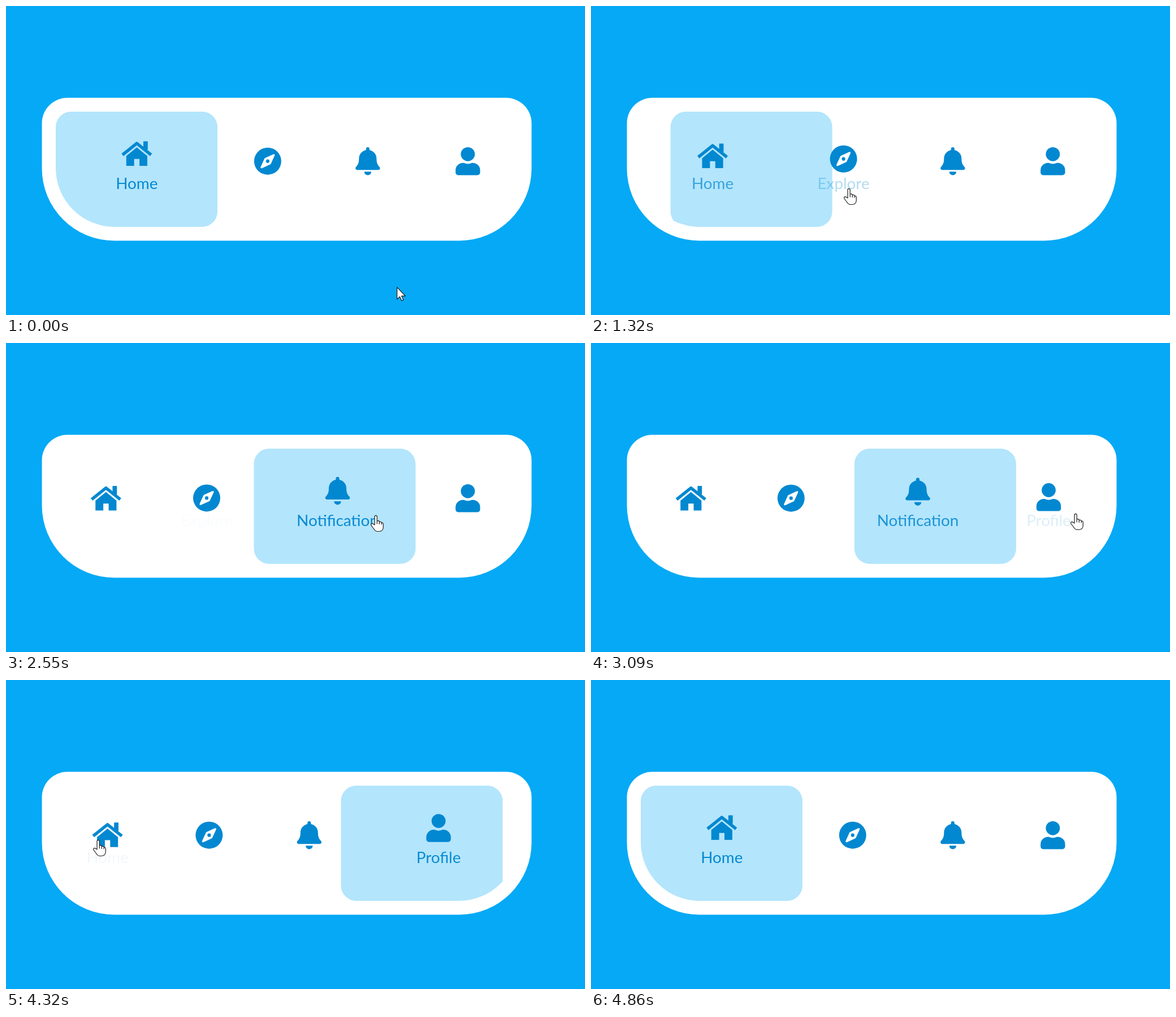
An HTML page for the animation above (5410 ms loop, 1024 by 547 pixels).

```html
<!DOCTYPE html>
<html lang="en">
<head>
<meta charset="utf-8">
<title>Navigation bar</title>
<style>
  html, body { margin: 0; width: 100%; height: 100%; overflow: hidden; background: #05a9f5; }
  svg { display: block; }
  text { font: 27.8px Lato, sans-serif; text-anchor: middle; }
</style>
</head>
<body>
<svg width="1024" height="547" viewBox="0 0 1024 547">
  <clipPath id="inner"><path id="window"/></clipPath>
  <path id="bar" fill="#fff"/>
  <rect id="pill" y="187" width="286" height="204" rx="27" fill="#b3e5fc"/>

  <g fill="#0288d1">
    <g class="item">
      <g>
        <path d="M-25.300 2.200L0-18.100 25.300 2.200" fill="none" stroke="#0288d1" stroke-width="5.500" stroke-linejoin="round"/>
        <rect x="11.600" y="-21.700" width="7.800" height="15" rx="1"/>
        <path d="M0-11L18.600 4.300V21.700H4.700V9.500H-4.700V21.700H-18.600V4.300z"/>
      </g>
      <text y="324">Home</text>
    </g>
    <g class="item">
      <g>
        <path fill-rule="evenodd" d="M-24 0a24 24 0 0 1 48 0a24 24 0 0 1-48 0zM9.700-12.200L-4.300-5.800Q-5.400-5.400-5.800-4.300L-12.200 9.700Q-13.400 13.400-9.700 12.200L4.300 5.800Q5.400 5.400 5.800 4.300L12.200-9.700Q13.400-13.400 9.700-12.200z"/>
        <circle r="3.100"/>
      </g>
      <text y="324">Explore</text>
    </g>
    <g class="item">
      <g>
        <path d="M-3.100-19.600v-2a3.100 3.100 0 0 1 6.200 0v2C10.200-18 15.500-12.200 15.500-4.600C15.500 5.300 18.900 8.200 20.800 10.200A3.100 3.100 0 0 1 18.600 15.500H-18.600A3.100 3.100 0 0 1-20.800 10.200C-18.900 8.200-15.500 5.300-15.500-4.600C-15.500-12.200-10.200-18-3.100-19.600z"/>
        <path d="M-6.200 18.600a6.200 6.200 0 0 0 12.400 0z"/>
      </g>
      <text y="324">Notification</text>
    </g>
    <g class="item">
      <g>
        <circle cy="-12.400" r="12.400"/>
        <path d="M-8.700 3.100h1.600a16.800 16.800 0 0 0 14.200 0h1.600a13 13 0 0 1 13 13v4a4.600 4.600 0 0 1-4.600 4.600h-34.200a4.600 4.600 0 0 1-4.600-4.600v-4a13 13 0 0 1 13-13z"/>
      </g>
      <text y="324">Profile</text>
    </g>
  </g>

  <g id="cursor" fill="#fff" stroke="#1c1c1c" stroke-width="1.200" stroke-linejoin="round">
    <path id="arrow" d="M.6 .8V22L5.400 17.600 8.700 24.600 11.800 23.200 8.600 16.400H15.200z"/>
    <path id="hand" d="M-2 17V2.500a2 2 0 0 1 4.200 0V10q3.600-1 4 1.600q3.500-1 4 1.600q3-.4 3 2.600V21c0 5-3 7.500-7.500 7.500H3c-3.500 0-5-2-6.500-4.500L-8.300 17.500c-.8-2.500 1.500-4 4-2zM2.200 10V15.500M6.200 11.600V16M10.200 13.200V16.500"/>
  </g>
</svg>
<script>
const LOOP = 5410, LAST = 63, STEP = 4860 / LAST;
const LEFT = 88, NARROW = 177, WIDE = 286, EASE_MS = 450;
const START = [1221, 2179, 3030, 4290];   // each activates the next item in turn

// time, x, y of the pointer tip at its turning points
const path = [
  [0, 691, 497], [620, 461, 359], [1000, 456, 323], [1400, 456, 323],
  [1780, 506, 321], [2090, 654, 305], [2560, 654, 305], [2940, 857, 302],
  [3320, 857, 302], [3470, 769, 345], [3630, 472, 427], [3930, 55, 335],
  [4090, 163, 283], [4480, 163, 283], [4850, 1040, 560]
];

const $ = id => document.getElementById(id);
const set = (el, name, value) => el.setAttribute(name, value);
const mix = (a, b, p) => a + (b - a) * p;

// Box with top corners of radius r and bottom corners of radius R
const box = (x, y, w, h, r, R) =>
  `M${x + r} ${y}h${w - 2 * r}a${r} ${r} 0 0 1 ${r} ${r}v${h - r - R}a${R} ${R} 0 0 1 ${-R} ${R}` +
  `h${2 * R - w}a${R} ${R} 0 0 1 ${-R} ${-R}v${r + R - h}a${r} ${r} 0 0 1 ${r} ${-r}z`;

set($('bar'), 'd', box(63.5, 162.5, 866, 253, 45, 128));
set($('window'), 'd', box(88, 187, 817, 204, 21, 104));

const items = [...document.querySelectorAll('.item')].map(el => el.children);

// The pill stays inside the bar while it slides
const holder = document.createElementNS('http://www.w3.org/2000/svg', 'g');
set(holder, 'clip-path', 'url(#inner)');
$('pill').replaceWith(holder);
const pill = holder.appendChild(document.createElementNS('http://www.w3.org/2000/svg', 'path'));
set(pill, 'd', box(0, 187, WIDE, 204, 27, 27));
set(pill, 'fill', '#b3e5fc');

// cubic-bezier(.25, .1, .25, 1)
function ease(x) {
  if (x <= 0 || x >= 1) return x <= 0 ? 0 : 1;
  const curve = (a, b, s) => 3 * a * s * (1 - s) ** 2 + 3 * b * s * s * (1 - s) + s ** 3;
  let lo = 0, hi = 1;
  for (let i = 0; i < 24; i++) {
    const mid = (lo + hi) / 2;
    if (curve(.25, .25, mid) < x) lo = mid; else hi = mid;
  }
  return curve(.1, 1, lo);
}

// How active each item is, 0 to 1
const weights = t => START.reduce((w, start, n) => {
  const p = ease((t - start) / EASE_MS);
  return w.map((v, i) => mix(v, +(i === (n + 1) % 4), p));
}, [1, 0, 0, 0]);

function pointer(t) {
  const i = path.findIndex(k => k[0] > t);
  if (i < 0) return path[path.length - 1].slice(1);
  const [t0, x0, y0] = path[i - 1], [t1, x1, y1] = path[i];
  const p = (t - t0) / (t1 - t0);
  return [mix(x0, x1, p), mix(y0, y1, p)];
}

function draw(now) {
  const t = Math.min(LAST, Math.floor(now % LOOP / STEP + .1)) * STEP;
  const w = weights(t);
  const slide = w.reduce((sum, v, i) => sum + v * i * NARROW, 0);
  set(pill, 'transform', `translate(${LEFT + slide} 0)`);

  let x = LEFT + .3;
  items.forEach(([icon, text], i) => {
    const width = mix(NARROW, WIDE, w[i]), cx = x + width / 2;
    set(icon, 'transform', `translate(${cx} ${mix(274.7, 261.3, w[i])})`);
    set(text, 'x', cx);
    set(text, 'opacity', w[i]);
    x += width;
  });

  const [px, py] = pointer(t);
  const over = px > 88 && px < 905 && py > 187 && py < 391;
  set($('cursor'), 'transform', `translate(${px} ${py})`);
  set($('hand'), 'display', over ? 'inline' : 'none');
  set($('arrow'), 'display', over ? 'none' : 'inline');
}

function tick(now) {
  draw(now);
  requestAnimationFrame(tick);
}
draw(0);
requestAnimationFrame(tick);
</script>
</body>
</html>
```
